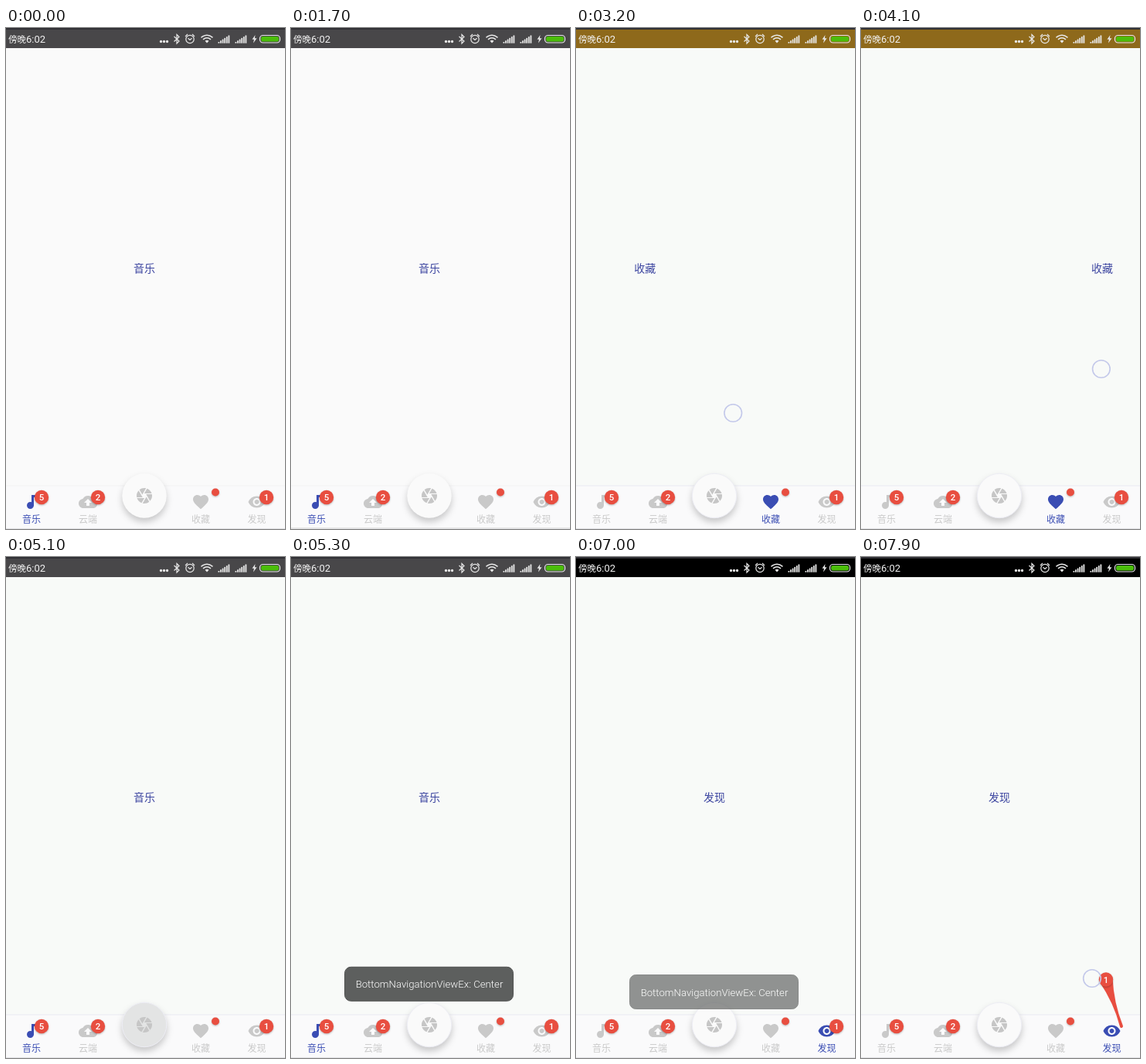
Recreate the animation shown at these times as an HTML page. Size 361x648 px, loop 8 s.

```html
<!DOCTYPE html>
<html lang="zh-CN">
<head>
<meta charset="utf-8">
<style>
html, body { margin: 0; width: 100%; height: 100%; overflow: hidden; }
svg { display: block; }
text { font-family: Roboto, "Noto Sans CJK SC", "Noto Sans CJK", sans-serif; }
.mid { text-anchor: middle; }
.page { font-size: 14px; fill: #3c45a0; }
.label { font-size: 12px; }
.badge { fill: #e84e40; filter: drop-shadow(0 1px 1px #0004); }
.num { font-size: 11.5px; font-weight: 500; fill: #fff; }
</style>
</head>
<body>
<svg width="361" height="648" viewBox="0 0 361 648">
  <defs><clipPath id="barClip"><path d="M0 592H361V647H0z"/></clipPath></defs>
  <rect id="back" width="361" height="648"/>
  <g id="pages"></g>

  <rect id="status" width="361" height="26"/>
  <rect width="361" height="2" fill="#303035"/>
  <text x="3" y="19" font-size="11.5" fill="#f2f2f2">傍晚<tspan font-size="13">6:02</tspan></text>
  <g id="icons" fill="#e8e8e8">
    <path d="M200.500 17.500h.01m4 0h.01m4 0h.01" stroke="#e8e8e8" stroke-width="3.400" stroke-linecap="round"/>
    <g fill="none" stroke="#e8e8e8" stroke-width="1.200">
      <path d="M217.500 11l6.500 6-3 3V8.500l3 3-6.500 6"/>
      <circle cx="238" cy="14.500" r="5.200"/>
      <path d="M235.500 13.200l2.500 2.300 2.500-2.300M232 11l3-3M244 11l-3-3"/>
      <path d="M252.500 12.300q7.500-6 15 0M255 14.800q5-4 10 0" stroke-width="1.600"/>
      <rect x="328.500" y="9.500" width="26" height="9.500" rx="4"/>
    </g>
    <path d="M257.500 16.700q2.500-2 5 0l-2.500 2.800z"/>
    <path d="M322.500 9l-4 5.700h2.500l-1 4.800 4.500-6.300h-2.700z"/>
    <rect x="330" y="11" width="23" height="6.500" rx="2.800" fill="#4bbd0b"/>
  </g>

  <rect y="592" width="361" height="55" fill="#fafafb"/>
  <rect id="edge" y="591.500" width="361" height="1"/>
  <rect id="foot" y="646" width="361" height="1" fill="#e6e6e6"/>
  <rect y="647" width="361" height="1" fill="#e3e3e6"/>
  <g clip-path="url(#barClip)"><circle id="ripple" cy="620" fill="#3f51b5"/></g>
  <g id="tabs"></g>
  <circle id="fab" cx="179" cy="605" r="28.700" style="filter:drop-shadow(0 5px 4px #0003)"/>
  <path fill="#c6c6c6" transform="translate(167 593)" d="M9.400 10.500l4.770-8.260C13.470 2.090 12.750 2 12 2c-2.400 0-4.600.85-6.320 2.250l3.660 6.350zM21.540 9c-.92-2.920-3.150-5.260-6-6.340L11.880 9zm.26 1h-7.490l5.050 8.750C21 16.970 22 14.610 22 12c0-.69-.07-1.350-.2-2zM8.540 12l-3.900-6.750C3.010 7.030 2 9.390 2 12c0 .69.07 1.350.2 2h7.490zm-6.080 3c.92 2.920 3.150 5.260 6 6.340L12.120 15zm11.270 0l-3.900 6.760c.7.15 1.420.24 2.170.24 2.400 0 4.600-.85 6.320-2.250l-3.660-6.350z"/>

  <g class="mid">
    <circle class="badge" cx="46" cy="607" r="9.200"/><text class="num" x="46" y="611">5</text>
    <circle class="badge" cx="119" cy="607" r="9.200"/><text class="num" x="119" y="611">2</text>
    <circle class="badge" cx="271" cy="600.500" r="5"/>
    <path id="tail" fill="#e84e40"/>
    <g id="one"><circle class="badge" r="9.200"/><text class="num" y="4">1</text></g>
  </g>

  <g id="toast">
    <rect x="69.500" y="540.500" width="218" height="44" rx="8" fill="#5d5f5e" stroke="#515352"/>
    <text class="mid" x="179" y="567.500" font-size="13.200" font-weight="300" fill="#fff">BottomNavigationViewEx: Center</text>
  </g>
  <circle id="ring" r="11.300" fill="none" stroke="#c3c8ea" stroke-width="1.600"/>
</svg>
<script>
const LOOP = 8000, STEP = 100, WIDTH = 361, SLIDE = 400;
const $ = id => document.getElementById(id);
const set = (el, attrs) => { for (const k in attrs) el.setAttribute(k, attrs[k]); };
const clamp = u => Math.min(1, Math.max(0, u));

const tabs = [
  { x: 33, name: '音乐', bar: '#484749', icon: 'M12 3v9.28c-.47-.17-.97-.28-1.5-.28C8.01 12 6 14.01 6 16.5S8.01 21 10.5 21c2.31 0 4.2-1.75 4.45-4H15V6h4V3z' },
  { x: 106, name: '云端', bar: '#4a5556', icon: 'M19.35 10.04C18.67 6.59 15.64 4 12 4 9.11 4 6.6 5.64 5.35 8.04 2.34 8.36 0 10.91 0 14c0 3.31 2.69 6 6 6h13c2.76 0 5-2.24 5-5 0-2.64-2.05-4.78-4.65-4.96zM14 13v4h-4v-4H7l5-5 5 5z' },
  { x: 252, name: '收藏', bar: '#8e691b', icon: 'M12 21.35l-1.45-1.32C5.4 15.36 2 12.28 2 8.5 2 5.42 4.42 3 7.5 3c1.74 0 3.41.81 4.5 2.09C13.09 3.81 14.76 3 16.5 3 19.58 3 22 5.42 22 8.5c0 3.78-3.4 6.86-8.55 11.54z' },
  { x: 324.5, name: '发现', bar: '#000', icon: 'M12 4.5C7 4.5 2.73 7.61 1 12c1.73 4.39 6 7.5 11 7.5s9.27-3.11 11-7.5c-1.73-4.39-6-7.5-11-7.5zM12 17c-2.76 0-5-2.24-5-5s2.24-5 5-5 5 2.24 5 5-2.24 5-5 5zm0-8c-1.66 0-3 1.34-3 3s1.34 3 3 3 3-1.34 3-3-1.34-3-3-3z' }
];
$('pages').innerHTML = tabs.map((p, i) =>
  `<text class="mid page" x="${179 + i * WIDTH}" y="315.5">${p.name}</text>`).join('');
$('tabs').innerHTML = tabs.map(p =>
  `<g><path d="${p.icon}" transform="translate(${p.x - 12} 601)" fill-rule="evenodd"/>
   <text class="mid label" x="${p.x}" y="640">${p.name}</text></g>`).join('');

for (const x0 of [274.5, 296.5])
  for (let i = 0; i < 6; i++)
    $('icons').innerHTML += `<rect x="${x0 + i * 2.6}" y="${18 - i * 1.7}" width="1.8" height="${1.7 + i * 1.7}"/>`;

// A move with a finger position is a swipe, otherwise a tap on its tab
const moves = [
  { t: 1800, to: 1 },
  { t: 2500, to: 2 },
  { t: 3136, to: 3, x: 293, y: 498 },
  { t: 3560, to: 2, x: 100, y: 455 },
  { t: 4004, to: 1, x: 178, y: 441 },
  { t: 4400, to: 0, x: 100, y: 438 },
  { t: 6500, to: 3 }
];
moves.forEach((m, i) => m.from = i ? moves[i - 1].to : 0);
const start = { t: 0, from: 0, to: 0 };
const presses = [{ t: 4900, x: 186, y: 602 }, { t: 5800, x: 333.5, y: 611.5 }];
const anchor = [337, 607], bend = [333, 535], goal = [299, 545];

function dragPoint(t) {
  const u = clamp((t - 7300) / 600) ** 2;
  return anchor.map((a, i) => (1 - u) ** 2 * a + 2 * u * (1 - u) * bend[i] + u * u * goal[i]);
}

function drawDrag(t) {
  const [ax, ay] = anchor, [x, y] = dragPoint(t - STEP);
  const dx = ax - x, dy = ay - y, len = Math.hypot(dx, dy);
  set($('one'), { transform: `translate(${x} ${y})` });
  if (len < 1) return set($('tail'), { d: '' });
  const nx = -dy / len, ny = dx / len, r = Math.max(2, 9 - len * .11);
  const side = (px, py, s) => `${px + nx * s} ${py + ny * s}`;
  const mid = `${(x + ax) / 2} ${(y + ay) / 2}`;
  set($('tail'), { d: `M${side(x, y, 9)}Q${mid} ${side(ax, ay, r)}A${r} ${r} 0 0 0 ${side(ax, ay, -r)}Q${mid} ${side(x, y, -9)}z` });
}

function drawToast(t) {
  const v = clamp((t - 5100) / SLIDE) - 1;
  const dy = -51 * (3.6 * v ** 3 + 2.6 * v ** 2);
  const opacity = clamp((t - 5100) / 200) * clamp((7200 - t) / 300);
  set($('toast'), { transform: `translate(0 ${dy})`, opacity });
}

function findTouch(t, move, shift) {
  const age = t - move.t;
  if (t >= 7300) return dragPoint(t);
  const press = presses.find(p => t >= p.t && t < p.t + 2 * STEP);
  if (press) return [press.x, press.y];
  if (move.x) return age < 200 && [move.x - shift * WIDTH, move.y];
  return move !== start && age < 200 && [tabs[move.to].x, 620];
}

function draw(t) {
  const early = t < 1800;
  const move = moves.filter(m => m.t <= t).pop() || start;
  const age = t - move.t;
  const shift = (move.to - move.from) * Math.sin(clamp(age / SLIDE) * Math.PI / 2);
  const tab = move.x && age < 150 ? move.from : move.to;

  set($('back'), { fill: early ? '#fafafa' : '#f8faf8' });
  set($('edge'), { fill: early ? '#f3f3f4' : '#ebebf4' });
  set($('foot'), { opacity: +(t >= 500 && early) });
  set($('status'), { fill: tabs[tab].bar });
  set($('pages'), { transform: `translate(${-(move.from + shift) * WIDTH} 0)` });
  [...$('tabs').children].forEach((g, i) => set(g, { fill: i === tab ? '#3a4db3' : '#c9c9c9' }));

  const pressed = t >= 4900 && t < 5300;
  set($('fab'), { fill: pressed ? '#e3e4e4' : '#fafafa', stroke: early ? 'none' : '#ececf3' });

  const u = move === start || move.x ? 1 : clamp(age / 500);
  set($('ripple'), { cx: tabs[move.to].x, r: 15 + 32 * clamp(u * 2), opacity: .1 * (1 - u) });

  drawToast(t);
  drawDrag(t);

  const touch = findTouch(t, move, shift);
  set($('ring'), { opacity: touch ? 1 : 0 });
  if (touch) set($('ring'), { cx: touch[0], cy: touch[1] });
}

const begin = performance.now();
function tick() {
  const t = (performance.now() - begin) % LOOP;
  draw(Math.floor(t / STEP) * STEP);
  requestAnimationFrame(tick);
}
tick();
</script>
</body>
</html>
```
